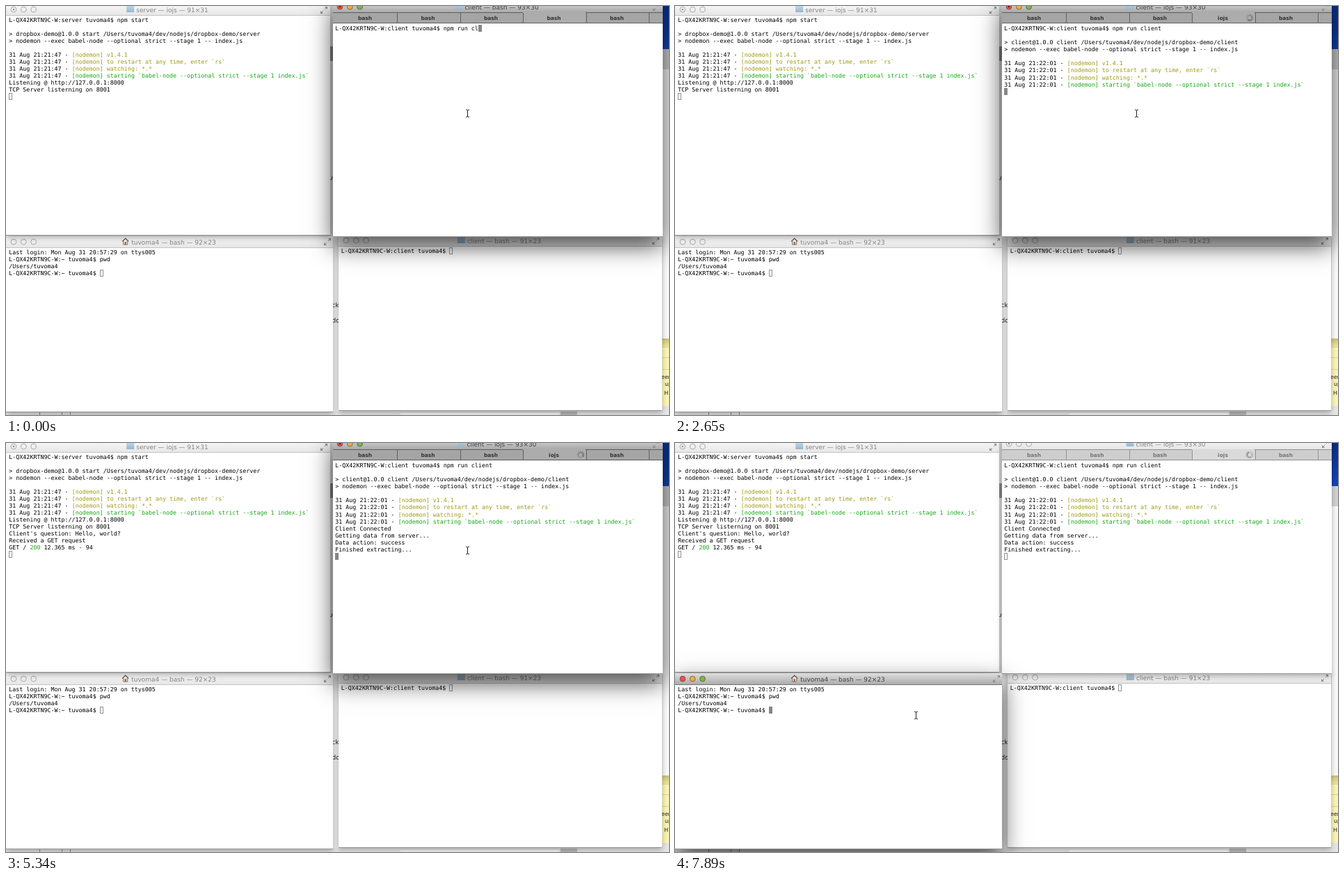
Write an HTML page with a canvas that moves like this. It is 953 px wide and 588 px high and loops after 8 s.

```html
<!DOCTYPE html>
<html lang="en">
<head>
<meta charset="utf-8">
<title>Terminal session</title>
<style>
  html, body { margin: 0; width: 953px; height: 588px; overflow: hidden; }
  canvas { display: block; }
</style>
</head>
<body>
<canvas id="stage" width="953" height="588"></canvas>
<script>
const ctx = document.getElementById('stage').getContext('2d');
ctx.textRendering = 'geometricPrecision';

const LOOP = 8000, SWITCH = 7890, BEAT = 150;
const CELL = 5.02, LINE = 10.03;
const MONO = '8.34px "DejaVu Sans Mono", monospace';
const SANS = '9px "DejaVu Sans", sans-serif';
const BOLD = 'bold 7.5px "DejaVu Sans", sans-serif';
const INK = { k: '#000', y: '#a09a12', g: '#16a816' };
const HOST = 'L-QX42KRTN9C-W', USER = 'tuvoma4';

const prompt = dir => `${HOST}:${dir} ${USER}$ `;
const nodemon = time => [
  '§yv1.4.1', '§yto restart at any time, enter `rs`', '§ywatching: *.*',
  '§gstarting `babel-node --optional strict --stage 1 index.js`'
].map(s => `31 Aug ${time} - ${s.slice(0, 2)}[nodemon] ${s.slice(2)}`);
const npmHeader = (name, path) => [
  '', `> ${name} /Users/${USER}/dev/nodejs/dropbox-demo/${path}`,
  '> nodemon --exec babel-node --optional strict --stage 1 -- index.js', ''
];

function rect(x, y, w, h, fill) {
  ctx.fillStyle = fill;
  ctx.fillRect(x, y, w, h);
}

function stroke(color, width, ...points) {
  ctx.strokeStyle = color;
  ctx.lineWidth = width;
  ctx.beginPath();
  points.forEach(([x, y]) => ctx.lineTo(x, y));
  ctx.stroke();
}

function shape(fill, ...points) {
  ctx.fillStyle = fill;
  ctx.beginPath();
  points.forEach(([x, y]) => ctx.lineTo(x, y));
  ctx.fill();
}

function text(s, x, y, font, fill, align = 'left') {
  ctx.font = font;
  ctx.fillStyle = fill;
  ctx.textAlign = align;
  ctx.fillText(s, x, y);
}

function gradient(y0, y1, from, to) {
  const g = ctx.createLinearGradient(0, y0, 0, y1);
  g.addColorStop(0, from);
  g.addColorStop(1, to);
  return g;
}

// § followed by an ink key changes the colour; the last line holds the caret.
function terminal(x, y, lines, active) {
  let col = 0;
  lines.forEach((line, row) => {
    col = 0;
    line.split(/§(.)/).reduce((ink, part, i) => {
      if (i % 2) return INK[part];
      text(part, x + col * CELL, y + row * LINE, MONO, ink);
      col += part.length;
      return ink;
    }, INK.k);
  });
  const cx = Math.round(x + col * CELL), cy = Math.round(y + (lines.length - 1) * LINE) - 8;
  if (active) return rect(cx, cy, 5, 10, '#868686');
  ctx.strokeStyle = '#929292';
  ctx.lineWidth = 1;
  ctx.strokeRect(cx + .5, cy + .5, 4, 9);
}

function button(x, y, color, dot) {
  ctx.beginPath();
  ctx.arc(x, y, 3.9, 0, 7);
  ctx.fillStyle = color || '#f0f0f0';
  ctx.fill();
  ctx.lineWidth = .9;
  ctx.strokeStyle = color ? 'rgba(60,30,20,.55)' : '#a2a2a2';
  ctx.stroke();
  if (dot) {
    ctx.beginPath();
    ctx.arc(x, y, 1.3, 0, 7);
    ctx.fillStyle = color ? '#701512' : '#909090';
    ctx.fill();
  }
}

function icon(x, y, home) {
  if (!home) {
    rect(x, y - 7, 5, 2, '#8fb0c8');
    rect(x, y - 6, 11, 9, gradient(y - 6, y + 3, '#bdd6e8', '#93b6d0'));
    return;
  }
  rect(x + 3, y - 3, 6, 6, '#f4f0e8');
  stroke('#77706a', 1, [x + 2.5, y - 2], [x + 2.5, y + 3], [x + 8.5, y + 3], [x + 8.5, y - 2]);
  stroke('#684b42', 1.2, [x + 1, y - 1.5], [x + 5.5, y - 6], [x + 10, y - 1.5]);
  rect(x + 4.5, y - 1, 2, 4, '#8b5a3c');
}

function expandIcon(x, y) {
  const c = '#8d8d8d';
  stroke(c, 1, [x + 1, y - 1], [x + 4, y - 4]);
  stroke(c, 1, [x - 1, y + 1], [x - 4, y + 4]);
  shape(c, [x + 1, y - 5], [x + 5, y - 5], [x + 5, y - 1]);
  shape(c, [x - 5, y + 1], [x - 5, y + 5], [x - 1, y + 5]);
}

function windowFrame(w, active) {
  ctx.save();
  ctx.shadowColor = active ? 'rgba(0,0,0,.7)' : 'rgba(0,0,0,.3)';
  ctx.shadowOffsetY = active ? 13 : 3;
  ctx.shadowBlur = active ? 32 : 8;
  rect(w.x, w.y, w.w, w.h, '#fff');
  ctx.restore();

  const [top, bottom] = active ? ['#dedede', '#a9a9a9'] : ['#f8f8f8', '#e6e6e6'];
  rect(w.x, w.y, w.w, w.bar - w.y, gradient(w.y, w.bar, top, bottom));
  if (!w.tabs) rect(w.x, w.bar - 1, w.w, 1, active ? '#777' : '#c4c4c4');
  rect(w.x, w.y + w.h - 1, w.w, 1, '#999');

  const [bx, by] = w.buttons;
  const lights = active ? ['#e9534c', '#e8b040', '#78b84a'] : [];
  for (let i = 0; i < 3; i++) button(bx + i * 14.3, by, lights[i], w.dot && !i);

  text(w.title, w.center, by + 3.5, SANS, active ? '#404040' : '#858585', 'center');
  icon(w.center - ctx.measureText(w.title).width / 2 - 14, by + 1, w.home);
  expandIcon(...w.expand);
}

function tabBar(active, running) {
  const line = active ? '#5f5f5f' : '#929292';
  rect(470, 9, 474, 16, active ? '#a5a5a5' : '#cecece');
  rect(743, 9, 90, 16, active ? '#acacac' : '#dadada');
  rect(470, 9, 273, 1, line);
  rect(833, 9, 111, 1, line);
  rect(470, 24, 474, 1, line);
  for (let i = 0; i < 5; i++) {
    rect(Math.round(562 + i * 90.5), 10, 1, 14, line);
    text(running && i === 3 ? 'iojs' : 'bash', 516 + i * 90.5, 20.3, BOLD,
      active ? '#333' : '#747474', 'center');
  }
}

function spinner(t) {
  const head = Math.floor(t / 83);
  for (let i = 0; i < 12; i++) {
    const a = i * Math.PI / 6, age = (head - i + 120) % 12;
    const at = r => [826 + r * Math.sin(a), 17 - r * Math.cos(a)];
    stroke(`rgba(35,35,35,${.9 - age * .06})`, .9, at(2.6), at(5.3));
  }
}

function pointer(t) {
  const p = Math.min(1, Math.max(0, (t - 6300) / 800)), k = p * p * (3 - 2 * p);
  const x = Math.round(663 - 317 * k), y = Math.round(154 + 237 * k);
  if (x < 470 && t < SWITCH) {
    const body = [[0, 0], [0, 10.5], [2.4, 8.3], [4, 12], [5.8, 11.2], [4.2, 7.6], [7.4, 7.4]]
      .map(([dx, dy]) => [x + dx, y - 1 + dy]);
    stroke('#fff', 2, ...body, body[0]);
    shape('#111', ...body);
  } else {
    stroke('#222', 1, [x + .5, y - 4], [x + .5, y + 5]);
    for (const [end, dir] of [[y - 5, 1], [y + 6, -1]])
      stroke('#222', 1, [x - 2, end], [x + .5, end + dir], [x + 3, end]);
  }
}

function desktop() {
  rect(0, 0, 953, 588, '#e6e6e6');
  rect(466, 0, 4, 332, '#e2e2e2');
  rect(465, 58, 5, 21, '#8c8c8c');
  text('u', 464, 250, 'italic ' + SANS, '#222');
  rect(470, 332, 8, 251, '#f0f0f0');
  text('ck', 468.5, 433, SANS, '#222');
  text('do', 468.5, 455, SANS, '#222');

  rect(944, 0, 9, 62, gradient(0, 62, '#0a2c86', '#1546b8'));
  rect(944, 62, 9, 29, '#d2d2d2');
  rect(944, 91, 9, 387, '#fafafa');
  rect(940, 478, 13, 97, '#fbf6b6');
  rect(940, 478, 13, 12, gradient(478, 490, '#c9c07a', '#f1e99c'));
  for (const y of [490, 505, 522]) rect(940, y, 13, 1, '#ddd594');
  [['een', 942, 536], ['up', 947, 546], ['H', 946, 559]].forEach(([s, x, y]) =>
    text(s, x, y, '8px "DejaVu Sans", sans-serif', '#222'));

  for (const x of [48, 80, 92]) rect(x, 584, 1, 4, '#888');
  rect(567, 585, 228, 3, '#f7f7f7');
  rect(797, 583, 24, 5, '#b8b8b8');
}

const server = { x: 0, y: -3, w: 466, h: 333, bar: 14, buttons: [11, 5], dot: true,
  center: 239, title: 'server — iojs — 91×31', expand: [457, 6] };
const client = { x: 470, y: -8, w: 474, h: 340, bar: 9, buttons: [480, 1], dot: true,
  center: 712.5, expand: [935, 2], tabs: true };
const home = { x: 0, y: 331, w: 470, h: 253, bar: 348, buttons: [11, 339], home: true,
  center: 241, title: USER + ' — bash — 92×23', expand: [462, 339] };
const spare = { x: 478, y: 329, w: 465, h: 253, bar: 346, buttons: [489, 337],
  center: 716, title: 'client — bash — 91×23', expand: [934, 338] };

function serverLines(t) {
  const lines = [prompt('server') + 'npm start',
    ...npmHeader('dropbox-demo@1.0.0 start', 'server'), ...nodemon('21:21:47'),
    'Listening @ http://127.0.0.1:8000', 'TCP Server listerning on 8001'];
  if (t >= 3100) lines.push("Client's question: Hello, world?");
  if (t >= 3250) lines.push('Received a GET request', 'GET / §g200§k 12.365 ms - 94');
  return [...lines, ''];
}

function clientLines(t) {
  const typed = [140, 290, 440, 580].filter(at => t >= at).length;
  const lines = [prompt('client') + 'npm run client'.slice(0, 10 + typed)];
  if (t < 1020) return lines;
  if (t >= 1470) lines.push(...npmHeader('client@1.0.0 client', 'client'));
  if (t >= 2060) lines.push(...nodemon('21:22:01'));
  if (t >= 3100) lines.push('Client Connected');
  if (t >= 3250) lines.push('Getting data from server...', 'Data action: success',
    'Finished extracting...');
  return [...lines, ''];
}

function drawServer(t) {
  windowFrame(server, false);
  terminal(4.3, 23, serverLines(t), false);
}

function drawClient(t, tick, active) {
  const running = t >= 1170;
  client.title = `client — ${running ? 'iojs' : 'bash'} — 93×30`;
  windowFrame(client, active);
  tabBar(active, running);
  if (t >= 1470) spinner(tick);
  terminal(473.3, 35.3, clientLines(t), active);
}

function drawHome(active) {
  windowFrame(home, active);
  terminal(4.3, 356.7, ['Last login: Mon Aug 31 20:57:29 on ttys005', prompt('~') + 'pwd',
    '/Users/' + USER, prompt('~')], active);
}

function drawSpare() {
  windowFrame(spare, false);
  terminal(481.8, 354.6, [prompt('client')], false);
}

function draw(now) {
  const t = now % LOOP;
  // Spinner and pointer move in steps of one beat.
  const tick = Math.floor((t - 90) / BEAT) * BEAT + 90;
  const switched = t >= SWITCH;
  desktop();
  drawSpare();
  if (!switched) drawHome(false);
  drawServer(t);
  drawClient(t, tick, !switched);
  if (switched) drawHome(true);
  pointer(tick);
  requestAnimationFrame(draw);
}

requestAnimationFrame(draw);
</script>
</body>
</html>
```
